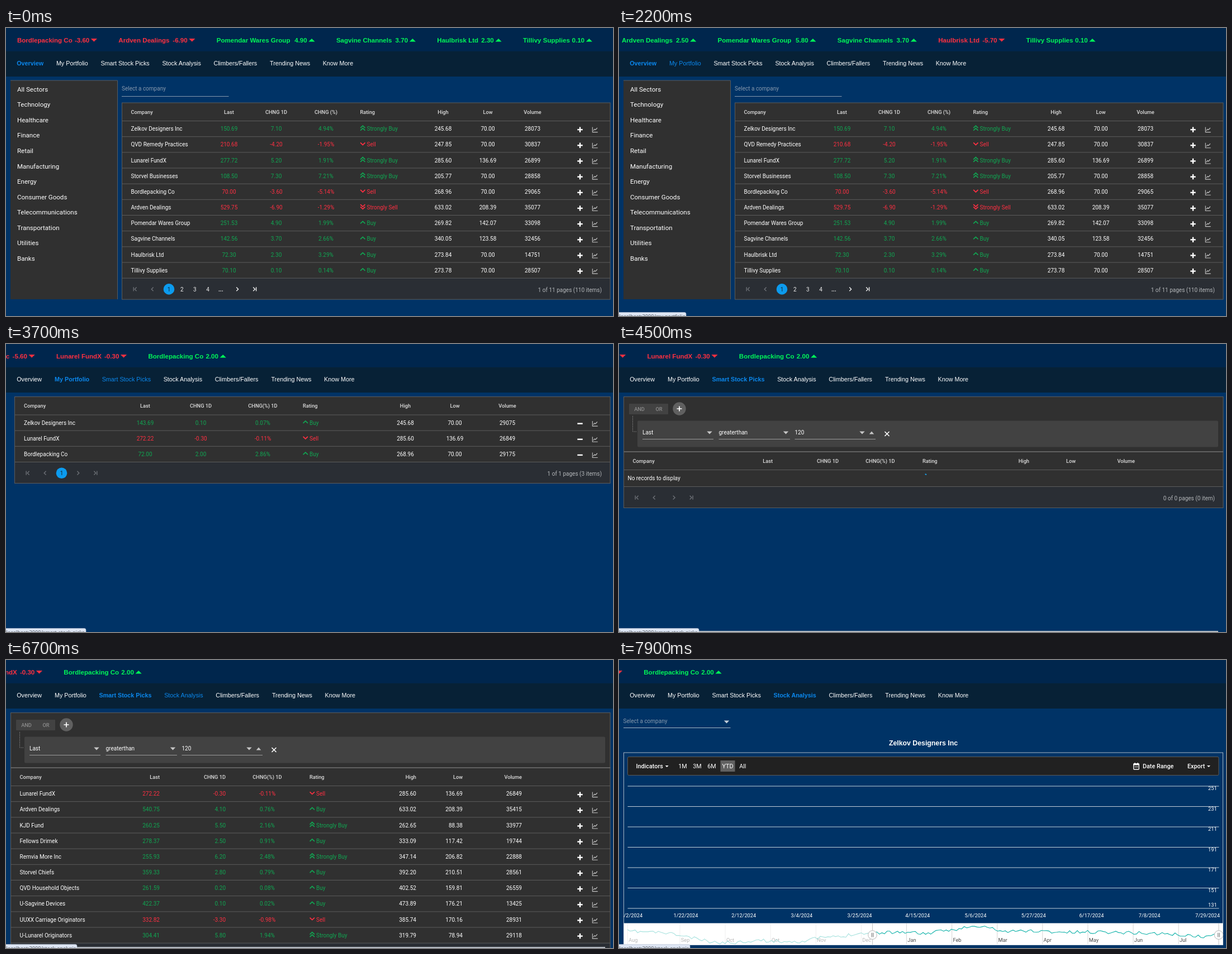
An HTML page for the animation above (8 s loop, 1086 by 516 pixels).

```html
<!DOCTYPE html>
<html lang="en">
<head>
<meta charset="utf-8">
<title>Stock dashboard</title>
<style>
  html, body { margin: 0; width: 100%; height: 100%; overflow: hidden; background: #003366; }
  svg { display: block; width: 100vw; height: 100vh; }
  text { font-family: Roboto, sans-serif; white-space: pre; }
  .sans { font-family: "Liberation Sans", Arial, sans-serif; }
  .url { font-family: "Open Sans", sans-serif; }
</style>
</head>
<body>
<svg id="stage" viewBox="0 0 1086 516"></svg>
<script>
const LOOP = 8000;
const GREEN = '#10a652', RED = '#ff2f42', BLUE = '#0b88ee', LINE = '#5c5c5c', PANEL = '#303030';
const ANCHOR = { l: 'start', c: 'middle', r: 'end' };

// --- drawing helpers, all returning SVG markup; text y is its visual middle
const text = (x, y, str, { size = 10, fill = '#fff', at = 'l', weight = 400, cls = '' } = {}) =>
  `<text class="${cls}" x="${x}" y="${y + size * 0.36}" font-size="${size}" fill="${fill}" font-weight="${weight}" text-anchor="${ANCHOR[at]}">${str}</text>`;
const rect = (x, y, w, h, fill, extra = '') => `<rect x="${x}" y="${y}" width="${w}" height="${h}" fill="${fill}" ${extra}/>`;
const stroke = (d, color = LINE, w = 1, extra = '') => `<path d="${d}" fill="none" stroke="${color}" stroke-width="${w}" ${extra}/>`;
const hline = (x1, x2, y, color, w) => stroke(`M${x1} ${y}H${x2}`, color, w);
const caret = (cx, cy, w, h, dir, fill) =>
  `<path d="M${cx - w / 2} ${cy - dir * h / 2}h${w}l${-w / 2} ${dir * h}z" fill="${fill}"/>`;

function rating(x, y, code) {
  const [label, dir, n] = {
    SB: ['Strongly Buy', -1, 2], B: ['Buy', -1, 1], S: ['Sell', 1, 1], SS: ['Strongly Sell', 1, 2],
  }[code];
  const color = dir < 0 ? GREEN : RED;
  let out = text(x + 12, y, label, { fill: color });
  for (let i = 0; i < n; i++) {
    const top = y - 1 + (n === 2 ? i * 4.4 - 2.4 : -0.3);
    out += stroke(`M${x + 0.6} ${top - dir * 2}l4.2 ${dir * 4}l4.2 ${-dir * 4}`, color, 1.7);
  }
  return out;
}

function rowIcons(y, minus) {
  const bar = rect(1022.3, y - 1.2, 9.4, 2.4, '#fff');
  return bar + (minus ? '' : rect(1025.8, y - 4.7, 2.4, 9.4, '#fff')) +
    stroke(`M1049.3 ${y - 4.5}v9h9.4`, '#c4c4c4', 1.1) +
    stroke(`M1050.8 ${y + 1.8}l2.3-2.6 1.6 1.2 3.2-3.6`, '#c4c4c4', 1.2);
}

function pager(x, y, { pages = [], next = false, label }) {
  const off = '#6c7076', on = '#f0f0f0';
  const arrow = (cx, dir, bar, color) => stroke(`M${cx - dir * 1.8} ${y - 3.4}l${dir * 3.4} 3.4l${-dir * 3.4} 3.4` +
    (bar ? `M${cx + dir * 3.6} ${y - 3.6}v7.2` : ''), color, 1.4);
  let out = arrow(x + 24.3, -1, true, off) + arrow(x + 54.3, -1, false, off);
  let px = x + 84;
  pages.forEach((p, i) => {
    if (!i) out += `<circle cx="${px}" cy="${y}" r="9.8" fill="#0c9bee"/>`;
    out += text(px, y, p, { at: 'c', fill: i ? on : '#16242e', weight: p === '...' ? 700 : 400 });
    px += 23.2;
  });
  const after = pages.length ? px + 6.5 : x + 90;
  const color = next ? on : off;
  return out + arrow(after, 1, false, color) + arrow(after + 30, 1, true, color) +
    text(1066, y + 1.5, label, { at: 'r', fill: '#b4b7ba' });
}

// cols: "title x align" per column; rows: "name|last|change|percent|rating|high|low|volume"
function grid({ x, y, cols, rows, minus, empty, page }) {
  const right = 1081, pitch = 28.17, first = y + 32.5;
  const end = first + (empty ? 30 : rows.length * pitch);
  let out = rect(x, y, right - x, end - y, PANEL) + rect(x, end, right - x, 38, '#2a2e34');
  cols.forEach(([title, cx, at]) => {
    out += text(cx, y + 16.3, title, { size: 9.24, at, weight: 500, fill: '#dcdcdc' });
  });
  out += hline(x, right, first);
  rows.forEach((row, r) => {
    const cy = first + 14.1 + r * pitch, cells = row.split('|');
    const tone = cells[2] < 0 ? RED : GREEN;
    cells.forEach((cell, i) => {
      const [, cx, at] = cols[i];
      out += i === 4 ? rating(cx, cy, cell) : text(cx, cy, cell, { at, fill: i > 0 && i < 4 ? tone : '#fff' });
    });
    out += rowIcons(cy + 1.5, minus) + hline(x, right, first + (r + 1) * pitch);
  });
  if (empty) out += text(x + 7, first + 15.3, empty) + hline(x, right, end);
  return out + pager(x, end + 19.7, page) + rect(x, y, right - x, end + 38 - y, 'none', `stroke="${LINE}"`);
}

const columns = (names, xs, aligns) => names.map((n, i) => [n, xs[i], aligns[i]]);
const HEAD = ['Company', 'Last', 'CHNG 1D', 'CHNG(%) 1D', 'Rating', 'High', 'Low', 'Volume'];

// --- pages
function overview() {
  const sectors = ['All Sectors', 'Technology', 'Healthcare', 'Finance', 'Retail', 'Manufacturing', 'Energy',
    'Consumer Goods', 'Telecommunications', 'Transportation', 'Utilities', 'Banks'];
  const head = HEAD.slice();
  head[3] = 'CHNG (%)';
  return rect(8, 94, 191.5, 392, PANEL) + stroke('M8 94H199.5V486', '#565b60') +
    sectors.map((s, i) => text(20, 109.5 + i * 27.57, s, { size: 11.55 })).join('') +
    text(207, 108, 'Select a company', { fill: '#8799ad' }) + hline(207, 398.5, 122.5, '#8799ad') +
    grid({
      x: 207.5, y: 134, cols: columns(head, [223.5, 399, 483.5, 572.5, 633.5, 782, 862, 942], 'lccclccc'),
      rows: [
        'Zelkov Designers Inc|150.69|7.10|4.94%|SB|245.68|70.00|28073',
        'QVD Remedy Practices|210.68|-4.20|-1.95%|S|247.85|70.00|30837',
        'Lunarel FundX|277.72|5.20|1.91%|SB|285.60|136.69|26899',
        'Storvel Businesses|108.50|7.30|7.21%|SB|205.77|70.00|28858',
        'Bordlepacking Co|70.00|-3.60|-5.14%|S|268.96|70.00|29065',
        'Ardven Dealings|529.75|-6.90|-1.29%|SS|633.02|208.39|35077',
        'Pomendar Wares Group|251.53|4.90|1.99%|B|269.82|142.07|33098',
        'Sagvine Channels|142.56|3.70|2.66%|B|340.05|123.58|32456',
        'Haulbrisk Ltd|72.30|2.30|3.29%|B|273.84|70.00|14751',
        'Tillivy Supplies|70.10|0.10|0.14%|B|273.78|70.00|28507',
      ],
      page: { pages: ['1', '2', '3', '4', '...'], next: true, label: '1 of 11 pages (110 items)' },
    });
}

const portfolio = () => grid({
  x: 15.5, y: 94.5, minus: true,
  cols: columns(HEAD, [32, 249, 348.5, 459.5, 531, 714.5, 803, 897], 'lccclccc'),
  rows: [
    'Zelkov Designers Inc|143.69|0.10|0.07%|B|245.68|70.00|29075',
    'Lunarel FundX|272.22|-0.30|-0.11%|S|285.60|136.69|26849',
    'Bordlepacking Co|72.00|2.00|2.86%|B|268.96|70.00|29175',
  ],
  page: { pages: ['1'], label: '1 of 1 pages (3 items)' },
});

function picks(loaded) {
  const grey = { size: 9.24, at: 'c', fill: '#8c8c8c', weight: 500 }, under = '#9a9a9a';
  const rows = loaded ? [
    'Lunarel FundX|272.22|-0.30|-0.11%|S|285.60|136.69|26849',
    'Ardven Dealings|540.75|4.10|0.76%|B|633.02|208.39|35415',
    'KJD Fund|260.25|5.50|2.16%|SB|262.65|88.38|33977',
    'Fellows Drimek|278.37|2.50|0.91%|B|333.09|117.42|19744',
    'Remvia More Inc|255.93|6.20|2.48%|SB|347.14|206.82|22888',
    'Storvel Chiefs|359.33|2.80|0.79%|B|392.20|210.51|28561',
    'QVD Household Objects|261.59|0.20|0.08%|B|402.52|159.81|26559',
    'U-Sagvine Devices|422.37|0.10|0.02%|B|473.89|176.21|13425',
    'UUXX Carriage Originators|332.82|-3.30|-0.98%|S|385.74|170.16|28931',
    'U-Lunarel Originators|304.41|5.80|1.94%|SB|319.79|78.94|29118',
  ] : [];
  return grid({
    x: 8.5, y: 193, rows, empty: loaded ? '' : 'No records to display',
    cols: columns(HEAD, [24.5, 275, 393, 467.5, 543, 734, 817, 923], 'lrrclrrr'),
    page: { label: '0 of 0 pages (0 item)' },
  }) +
    rect(8.5, 94.5, 1072.5, 98.5, PANEL, `stroke="${LINE}"`) + hline(8.5, 1081, 193, '#777') +
    rect(18, 107, 70, 19, '#424242', 'rx="1"') + text(36.5, 116.3, 'AND', grey) + text(71.5, 116.3, 'OR', grey) +
    '<circle cx="108" cy="116" r="11.7" fill="#606060"/>' + stroke('M103.5 116h9M108 111.5v9', '#fff', 1.7) +
    stroke('M24.5 129V157H32', '#8a8a8a', 1, 'stroke-dasharray="1.5 1.5"') +
    rect(33, 137.5, 1039, 47, '#424242', 'rx="2"') +
    [[42, 169, 'Last'], [178.5, 306, 'greaterthan'], [314.5, 459, '120']]
      .map(([a, b, s]) => text(a, 158.3, s) + hline(a, b, 170.5, under)).join('') +
    [[162, 1], [298.5, 1], [435, 1], [452, -1]]
      .map(([cx, dir], i) => caret(cx, 159, i < 3 ? 9.5 : 8.5, 5, dir, '#c6c6c6')).join('') +
    stroke('M475.5 157l8 8m0-8l-8 8', '#fff', 1.6) + rect(0, 514, 1072, 2, '#b4bac2');
}

const analysis = () => text(7.5, 109.5, 'Select a company', { fill: '#8799ad' }) +
  hline(8, 199.5, 121.5, '#a9b6c4') + caret(192.5, 111, 9.5, 5, 1, '#c6d0da');

function seriesPath(from, to) {
  const knots = [[15, 486], [50, 487], [85, 489], [112, 494], [140, 500], [168, 506], [212, 506], [240, 502], [285, 504],
    [330, 504], [362, 497], [400, 496], [420, 490], [450, 489], [505, 487], [550, 490], [592, 484], [620, 479],
    [655, 478], [690, 487], [730, 485], [800, 488], [860, 487], [930, 489], [985, 491], [1045, 496], [1073, 492]];
  let seed = 11, k = 0, d = '';
  for (let x = 15; x <= 1073; x += 4.6) {
    seed = (seed * 16807) % 2147483647;
    while (knots[k + 1] && x > knots[k + 1][0]) k++;
    const [x0, y0] = knots[k], [x1, y1] = knots[k + 1] || knots[k];
    const y = y0 + (y1 - y0) * (x - x0) / ((x1 - x0) || 1) + (seed / 2147483647 - 0.5) * 6;
    if (x >= from && x <= to) d += `${d ? 'L' : 'M'}${x.toFixed(1)} ${y.toFixed(1)}`;
  }
  return d;
}

function chart() {
  const bold = { size: 10.78, weight: 500 }, mid = { size: 10.78, at: 'c' };
  let out = text(544.5, 149, 'Zelkov Designers Inc', { size: 12.3, weight: 700, at: 'c', cls: 'sans' }) +
    rect(8.5, 166, 1072, 344.5, 'none', 'stroke="#a9b6c4"') +
    rect(15.5, 173.5, 1057.5, 33, '#212121', 'rx="2" stroke="#5a5a5a"') +
    rect(181.5, 180, 26, 20, '#616161') +
    text(30.5, 190, 'Indicators', bold) + caret(85.7, 190.5, 6, 3.2, 1, '#fff') +
    [[114, '1M'], [140, '3M'], [166, '6M'], [194.5, 'YTD'], [221.3, 'All']].map(([x, s]) => text(x, 190, s, mid)).join('') +
    rect(920.7, 186, 9.6, 10, 'none', 'stroke="#fff" stroke-width="1.3" rx="1"') + rect(920.5, 185.5, 10, 3, '#fff') +
    stroke('M923 184v2M928 184v2', '#fff', 1.4) + stroke('M922.7 191.5h6', '#fff', 1.6, 'stroke-dasharray="1.5 .7"') +
    text(937, 190.3, 'Date Range', bold) + text(1017, 190.3, 'Export', bold) + caret(1055, 190.5, 6, 3.2, 1, '#fff');

  for (let i = 0; i < 7; i++) {
    const y = 226 + i * 36.5;
    out += hline(15.5, 1073.5, y, '#c3cdd8') +
      text(1069.7, i < 6 ? y + 3.8 : 438.5, 251 - 20 * i, { size: 9.24, at: 'r' });
  }
  const days = ['1/2', '1/22', '2/12', '3/4', '3/25', '4/15', '5/6', '5/27', '6/17', '7/8', '7/29'];
  out += '<g clip-path="url(#plot)">' + days.map((d, i) =>
    text(i === 0 ? 22.7 : i === 10 ? 1053 : 119.5 + (i - 1) * 103.7, 457.5, d + '/2024', { size: 9.24, at: 'c' })).join('') + '</g>';

  out += rect(8.5, 471.5, 1072, 39, '#fff');
  const months = ['Aug', 'Sep', 'Oct', 'Oct', 'Nov', 'Dec', 'Jan', 'Feb', 'Mar', 'Apr', 'May', 'Jun', 'Jul'];
  months.forEach((m, i) => {
    const x = i ? 109 + (i - 1) * 81.1 : 15.5, dim = i < 6;
    out += stroke(`M${x} 472V509`, dim ? '#efefef' : '#d6d6d6') +
      text(x + 1.8, 501.3, m, { size: 9.24, fill: dim ? '#b9b9b9' : '#4a4a4a' });
  });
  out += stroke(seriesPath(0, 455), '#a6e2de', 1.1) + stroke(seriesPath(451, 1074), '#12b3aa', 1.1) +
    stroke('M453.5 472V510M1073 472V510', '#c4c4c4');
  for (const x of [453.5, 1073]) {
    out += `<circle cx="${x}" cy="492.6" r="7.8" fill="#fff" stroke="#b5b5b5"/>` +
      stroke(`M${x - 1.3} 488.8v7.6M${x + 1.3} 488.8v7.6`, '#777', 1.1);
  }
  return out;
}

// --- navigation bar
const NAV = ['Overview', 'My Portfolio', 'Smart Stock Picks', 'Stock Analysis', 'Climbers/Fallers', 'Trending News', 'Know More'];
const NAV_X = [19.2, 87, 166.5, 276.5, 368.5, 469.2, 563.8];
const BOLD_GROWTH = [2.9, 5.2, 6.7, 7];
const nav = (active, hover) => NAV.map((s, i) =>
  text(NAV_X[i] + (i > active ? BOLD_GROWTH[active] : 0), 63.6, s, {
    size: 10.78, cls: 'sans', weight: i === active ? 700 : 400, fill: i === active || i === hover ? BLUE : '#fff',
  })).join('');

// --- ticker: [name, width to the value, change]
function ticker(items) {
  let x = 0;
  return items.map(([name, w, value]) => {
    const down = value < 0, fill = down ? '#ff3040' : '#00f658';
    const style = { size: 11.55, weight: 700, cls: 'sans', fill };
    const tip = x + w + (down ? 28.9 : 25.2);
    const out = text(x, 22, name, style) + text(x + w, 22, value, style) + caret(tip + 5.6, 21.8, 11.2, 5.6, down ? 1 : -1, fill);
    x = tip + 49.5;
    return out;
  }).join('');
}
const market = (energy, goods, transport) => ticker([
  ['Bordlepacking Co', 103, '-3.60'], ['Ardven Dealings', 97, energy], ['Pomendar Wares Group', 139.5, goods],
  ['Sagvine Channels', 105.7, '3.70'], ['Haulbrisk Ltd', 79, transport], ['Tillivy Supplies', 87.5, '0.10'],
]);
const TICKERS = [
  market('-6.90', '4.90', '2.30'),
  market('2.50', '5.80', '-5.70'),
  ticker([['Zelkov Designers Inc', 121, '-5.60'], ['Lunarel FundX', 86, '-0.30'], ['Bordlepacking Co', 103, '2.00']]),
];
const OWNED_LEAD = 121 + 28.9 + 49.5;

// --- timeline
const PAGES = [[0, overview()], [2300, portfolio()], [4100, picks(false)], [4900, picks(true)], [7000, analysis()], [7500, analysis() + chart()]];
const ACTIVE = [[0, 0], [2300, 1], [4100, 2], [7000, 3]];
const HOVER = [[0, -1], [700, 4], [1050, -1], [1900, 1], [2900, -1], [3200, 2], [4300, -1], [5900, 3], [7300, -1]];
const FEED = [[0, 0], [1100, 1], [3600, 2]];
const STATUS = [[0, ''], [1100, 'climbers-fallers', 133], [1800, ''], [2050, 'my-portfolio', 120], [2500, 'my-portfolio', 366],
  [3000, ''], [3400, 'smart-stock-picks', 143], [6100, 'stock-analysis', 127]];
const MARKET_X = [[0, 20], [1300, -94.5], [2800, -231], [3600, -303.5]];
const OWNED_X = [[3600, 95], [4500, 50.5], [5300, 8.5], [6700, -61], [8000, -125]];
const SPINNERS = [[1280, 1700, 644, 310], [4470, 4900, 544.7, 243.5]];

const current = (track, t) => track.reduce((hit, step) => (step[0] <= t ? step : hit));
function lerpTrack(track, t) {
  const i = Math.max(0, Math.min(track.length - 2, track.findIndex(p => p[0] > t) - 1));
  const [[t0, a], [t1, b]] = track.slice(i, i + 2);
  return a + (b - a) * (t - t0) / (t1 - t0);
}

function status([, path, width]) {
  if (!path) return '';
  return rect(-4, 509.5, width + 4, 12, '#dde5f3', 'rx="3" stroke="#b9c3d2" stroke-width=".6"') +
    text(0.5, 517, 'localhost:3000/' + path, { size: 9.2, fill: '#555b63', cls: 'url' });
}

function spinner(t) {
  const s = SPINNERS.find(([a, b]) => t >= a && t < b);
  if (!s) return '';
  const [start, , cx, cy] = s, age = t - start, r = 10.8;
  const turn = age * 0.012, sweep = 0.25 + Math.min(4, Math.max(0, age - 40) * 0.01);
  const at = a => `${cx + r * Math.sin(a)} ${cy - r * Math.cos(a)}`;
  return stroke(`M${at(turn - 0.1)}A${r} ${r} 0 ${sweep > Math.PI ? 1 : 0} 1 ${at(turn - 0.1 + sweep)}`, '#19a5f0', 2);
}

const stage = document.getElementById('stage');
stage.innerHTML = '<clipPath id="plot"><rect x="8.5" y="440" width="1072" height="30"/></clipPath>' +
  rect(0, 0, 1086, 516, '#003366') + rect(0, 0, 1086, 41.5, '#00264d') + rect(0, 41.5, 1086, 45.5, '#072136') +
  ['page', 'spin', 'nav', 'ticker', 'status'].map(id => `<g id="${id}"></g>`).join('');
const shown = {};
function put(id, markup) {
  if (shown[id] !== markup) document.getElementById(id).innerHTML = shown[id] = markup;
}

function render(t) {
  const feed = current(FEED, t)[1];
  const x = feed < 2 ? lerpTrack(MARKET_X, t) : lerpTrack(OWNED_X, t) - OWNED_LEAD;
  put('page', current(PAGES, t)[1]);
  put('spin', spinner(t));
  put('nav', nav(current(ACTIVE, t)[1], current(HOVER, t)[1]));
  put('ticker', TICKERS[feed]);
  document.getElementById('ticker').setAttribute('transform', `translate(${x.toFixed(2)} 0)`);
  put('status', status(current(STATUS, t)));
}

const begin = performance.now();
function frame(now) {
  render(Math.max(0, now - begin) % LOOP);
  requestAnimationFrame(frame);
}
render(0);
requestAnimationFrame(frame);
</script>
</body>
</html>
```
